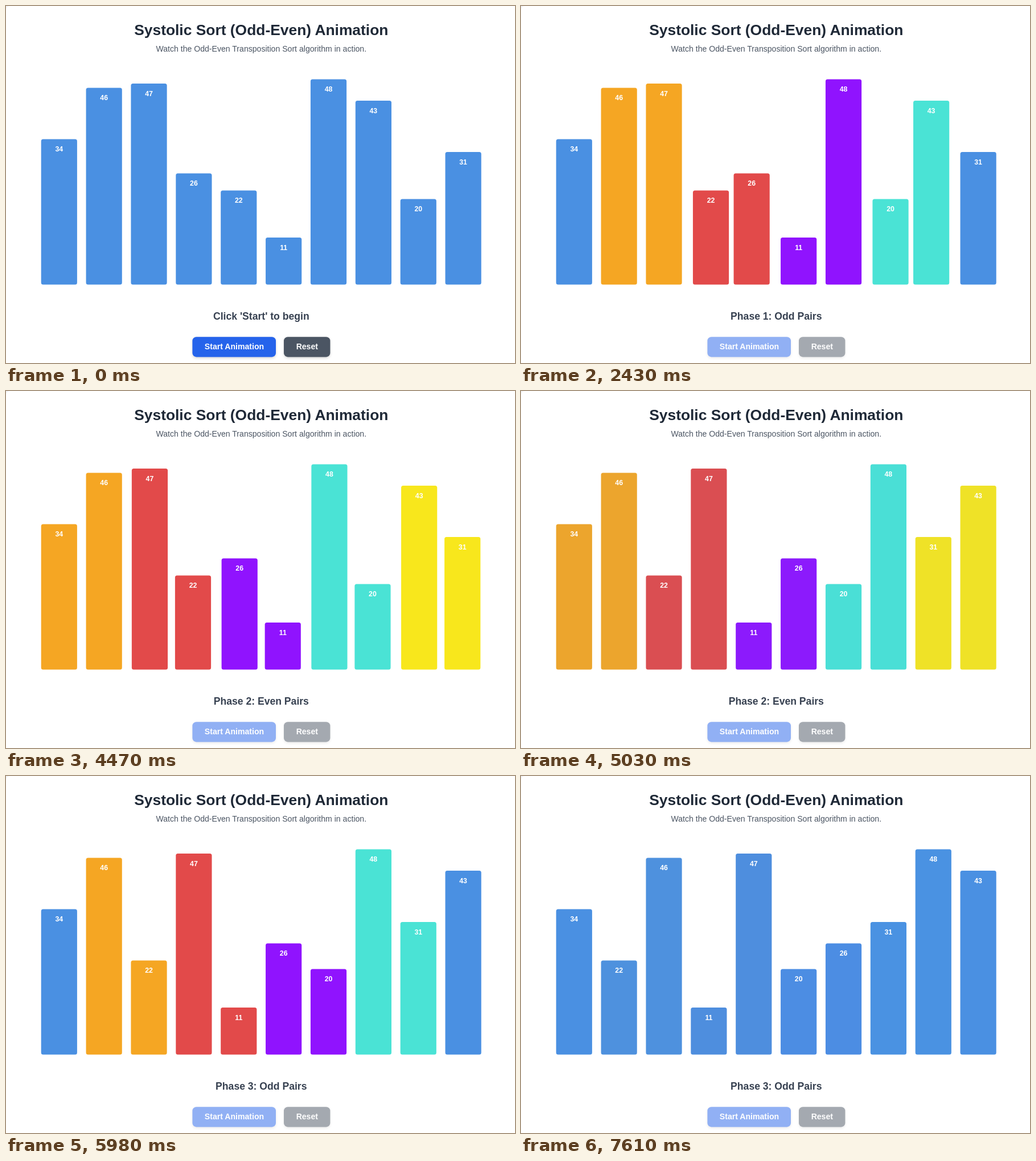
An HTML page for the animation above (8 s loop, 894 by 626 pixels).

```html
<!DOCTYPE html>
<html lang="en">
<head>
<meta charset="utf-8">
<title>Systolic Sort</title>
<style>
  html, body { margin: 0; width: 100%; height: 100%; overflow: hidden; background: #fff; }
  svg { display: block; width: 894px; height: 626px; }
  text { font-family: "Liberation Sans", Arial, sans-serif; font-weight: 700; text-anchor: middle; }
  .title { font-size: 26.4px; fill: #1f2937; }
  .sub { font-size: 14.08px; font-weight: 400; fill: #4b5563; }
  .status { font-size: 17.6px; fill: #374151; }
  .label { font-size: 12.32px; fill: #fff; }
  .btn text { font-size: 14.08px; fill: #fff; }
  .btn { filter: drop-shadow(0 2px 2px rgba(0, 0, 0, .16)); }
</style>
</head>
<body>
<svg viewBox="0 0 894 626">
  <rect width="894" height="626" fill="#f3f4f6"/>
  <rect width="920" height="660" rx="7" fill="#fff"/>
  <text class="title" x="448.3" y="51">Systolic Sort (Odd-Even) Animation</text>
  <text class="sub" x="448.3" y="80">Watch the Odd-Even Transposition Sort algorithm in action.</text>
  <g id="bars"></g>
  <text class="status" id="status" x="448.3" y="550"></text>
  <g class="btn">
    <rect id="start" x="327.4" y="580.2" width="146.6" height="35.2" rx="7"/>
    <text x="401" y="602.4">Start Animation</text>
  </g>
  <g class="btn">
    <rect x="488" y="580.2" width="81.4" height="35.2" rx="7" fill="#4b5563"/>
    <text x="528.8" y="602.4">Reset</text>
  </g>
</svg>
<script>
const LOOP = 8000;
const VALUES = [34, 46, 47, 26, 22, 11, 48, 43, 20, 31];
const LEFT = 61.7, PITCH = 78.87, WIDTH = 63.2, BASE = 488.5, UNIT = 7.5;
const BLUE = [74, 144, 226];
const PAIR_COLORS = [[245, 166, 35], [226, 74, 74], [144, 19, 254], [74, 227, 213], [248, 231, 28]];
const IDLE = [37, 99, 235], HOVER = [29, 78, 216];

// Offsets inside a phase, in ms
const SWAP_AT = 1140, SWAP_MS = 500, FADE_AT = 1695, FADE_MS = 300;
const PHASES = [
  { at: 925, first: 1, name: "Phase 1: Odd Pairs" },
  { at: 3315, first: 0, name: "Phase 2: Even Pairs" },
  { at: 5675, first: 1, name: "Phase 3: Odd Pairs" }
];

const $ = id => document.getElementById(id);
const clamp = v => Math.min(1, Math.max(0, v));
const lerp = (a, b, p) => a + (b - a) * p;
const mix = (a, b, p) => a.map((v, i) => lerp(v, b[i], p));
const rgb = c => `rgb(${c.map(Math.round)})`;
const cubic = (a, b, s) => 3 * a * s * (1 - s) ** 2 + 3 * b * s * s * (1 - s) + s ** 3;

// cubic-bezier(.25, .1, .25, 1)
function ease(p) {
  let lo = 0, hi = 1;
  for (let i = 0; i < 20; i++) {
    const mid = (lo + hi) / 2;
    if (cubic(.25, .25, mid) < p) lo = mid; else hi = mid;
  }
  return cubic(.1, 1, lo);
}
const step = (t, at, ms) => t <= at ? 0 : t >= at + ms ? 1 : ease((t - at) / ms);

function add(parent, tag, attrs) {
  const el = document.createElementNS("http://www.w3.org/2000/svg", tag);
  for (const key in attrs) el.setAttribute(key, attrs[key]);
  return parent.appendChild(el);
}

const bars = VALUES.map(value => {
  const group = add($("bars"), "g", {});
  const height = value * UNIT, top = BASE - height;
  const rect = add(group, "rect", { y: top, width: WIDTH, height, rx: 3.5 });
  add(group, "text", { class: "label", x: WIDTH / 2, y: top + 21.5 }).textContent = value;
  return { group, rect };
});

// Run the sort once, keeping each bar's slots and colour per phase
let order = VALUES.map((_, i) => i);
for (const phase of PHASES) {
  const next = order.slice();
  phase.moves = [];
  order.forEach((bar, slot) => { phase.moves[bar] = { from: slot, to: slot, color: BLUE }; });
  for (let i = phase.first, pair = 0; i + 1 < order.length; i += 2, pair++) {
    const a = order[i], b = order[i + 1];
    phase.moves[a].color = phase.moves[b].color = PAIR_COLORS[pair];
    if (VALUES[a] > VALUES[b]) {
      phase.moves[a].to = i + 1;
      phase.moves[b].to = i;
      next[i] = b;
      next[i + 1] = a;
    }
  }
  order = next;
}

function draw(t) {
  const phase = PHASES.filter(p => t >= p.at).pop();
  const local = phase ? t - phase.at : 0;
  const moved = step(local, SWAP_AT, SWAP_MS);
  const tint = step(local, 0, FADE_MS) - step(local, FADE_AT, FADE_MS);

  bars.forEach(({ group, rect }, i) => {
    const move = (phase || PHASES[0]).moves[i];
    const x = LEFT + PITCH * lerp(move.from, move.to, moved);
    group.setAttribute("transform", `translate(${x.toFixed(3)} 0)`);
    rect.setAttribute("fill", rgb(mix(BLUE, move.color, clamp(tint))));
  });

  $("status").textContent = phase ? phase.name : "Click 'Start' to begin";
  const hover = t < 2080 ? step(t, 650, 150) : 0;
  $("start").setAttribute("fill", rgb(mix(IDLE, HOVER, hover)));
  const opacity = 1 - .5 * step(t, PHASES[0].at, 200);
  document.querySelectorAll(".btn").forEach(b => { b.style.opacity = opacity; });
}

const began = performance.now();
function tick() {
  draw((performance.now() - began) % LOOP);
  requestAnimationFrame(tick);
}
tick();
</script>
</body>
</html>
```
